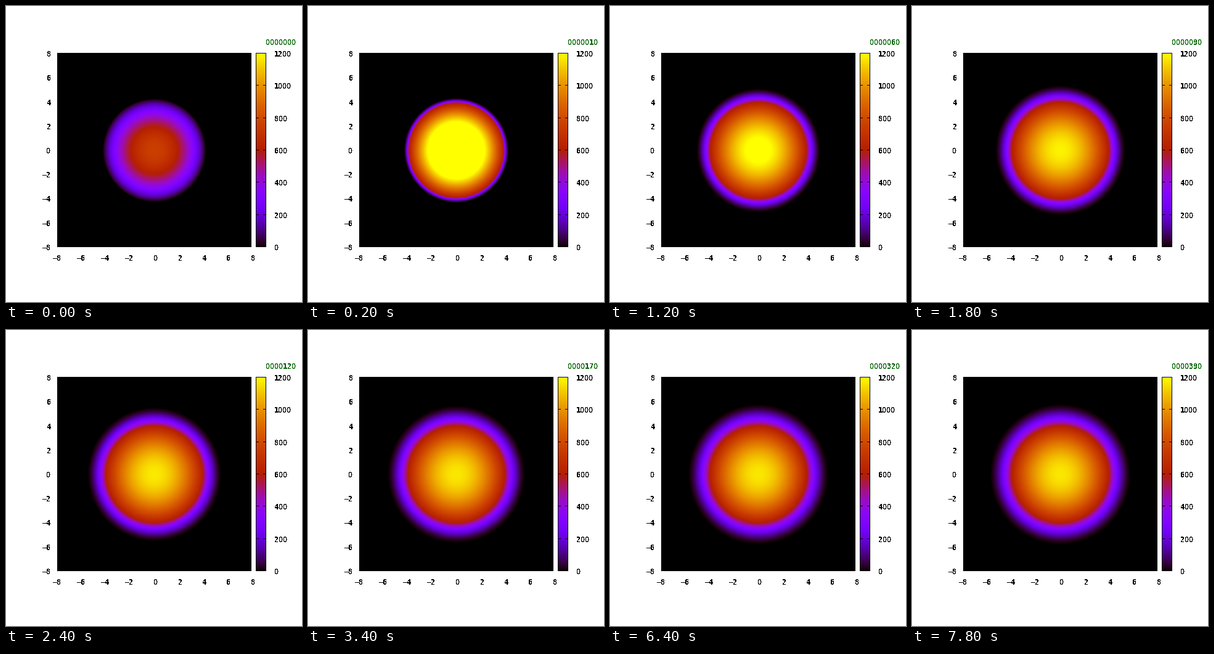
Write a matplotlib script that moves like this. It is 480x480 px and loops after 8000 ms.

```python
import numpy as np
import matplotlib.pyplot as plt
from matplotlib.animation import FuncAnimation

SIZE, DPI = 480, 100
FRAMES, STEP_MS = 40, 200
LEFT, TOP, SIDE = 83, 76, 315        # plot square in pixels
BAR_L, BAR_R = 405, 421              # colour bar columns
H_MAX = 1200
CENTER_X, CENTER_Y = 240, 233.5
SCALE = (SIDE - 1) / 16              # pixels per axis unit
FONT_PX = 7 / 0.602                  # gives a 7 px advance


def palette(h):
    """Black, violet, red, yellow: sqrt(x), x^3, sin(2 pi x)."""
    x = np.clip(h / H_MAX, 0, 1)
    rgb = np.stack([np.sqrt(x), x ** 3, np.sin(2 * np.pi * x)], axis=-1)
    return np.clip(rgb, 0, 1)


def height(r, n):
    """Radial profile: parabolic core and a soft tail that spreads out."""
    if n == 0:
        return 755 * (1 - r ** 2 / 18)
    peak = 1162 + 1270 * np.exp(-0.46 * n) - 1690 * np.exp(-1.4 * n)
    core_r = 4.0 - 0.12 * np.exp(-0.25 * n)
    edge = 5.8 - 1.72 * np.exp(-0.15 * n)
    core = 600 + (peak - 600) * (1 - (r / core_r) ** 2)
    tail = 600 * (np.clip(edge - r, 0, None) / (edge - core_r)) ** 1.65
    return np.where(r < core_r, core, tail)


def base_canvas():
    img = np.ones((SIZE, SIZE, 3))
    bottom = TOP + SIDE - 1
    ramp = palette(np.linspace(H_MAX, 0, SIDE))
    img[TOP:bottom + 1, BAR_L:BAR_R + 1] = ramp[:, None]
    img[[TOP, bottom], BAR_L:BAR_R + 1] = 0
    img[TOP:bottom + 1, [BAR_L, BAR_R]] = 0
    for k in range(1, 6):
        y = round(bottom - k * (SIDE - 1) / 6)
        img[y, BAR_L:BAR_L + 5] = 0
        img[y, BAR_R - 4:BAR_R + 1] = 0
    return img


plt.rcParams["text.antialiased"] = False
fig = plt.figure(figsize=(SIZE / DPI, SIZE / DPI), dpi=DPI, facecolor="white")
ax = fig.add_axes([0, 0, 1, 1])
ax.axis("off")

canvas = base_canvas()
picture = ax.imshow(canvas, extent=(0, SIZE, SIZE, 0), interpolation="nearest")
ax.set_xlim(0, SIZE)
ax.set_ylim(SIZE, 0)


def plain(s):
    """Round letter in place of the font's dotted zero, and a wide minus."""
    return str(s).replace("0", "O").replace("-", "\u2212")


def label(x, mid, s, ha="left", color="black"):
    return ax.text(x, mid + 5, plain(s), ha=ha, va="baseline", color=color,
                   family="DejaVu Sans Mono", weight="bold",
                   size=FONT_PX * 72 / DPI)


for v in range(-8, 9, 2):
    offset = (v + 8) * SCALE
    label(73, round(TOP + SIDE - offset), v, ha="right")
    label(round(LEFT + offset + 6.5), 408, v, ha="right")
for v in range(0, H_MAX + 1, 200):
    label(435, round(TOP + SIDE - v / H_MAX * (SIDE - 1)), v)
counter = label(421, 58, "0000000", color="#006400")

rows, cols = np.mgrid[TOP:TOP + SIDE, LEFT:LEFT + SIDE]
radius = np.hypot(cols - CENTER_X, rows - CENTER_Y) / SCALE


def draw(n):
    canvas[TOP:TOP + SIDE, LEFT:LEFT + SIDE] = palette(height(radius, n))
    picture.set_data(canvas)
    counter.set_text(plain(f"{n * 10:07d}"))
    return picture, counter


anim = FuncAnimation(fig, draw, frames=FRAMES, interval=STEP_MS,
                     repeat=True, repeat_delay=0)
plt.show()
```
